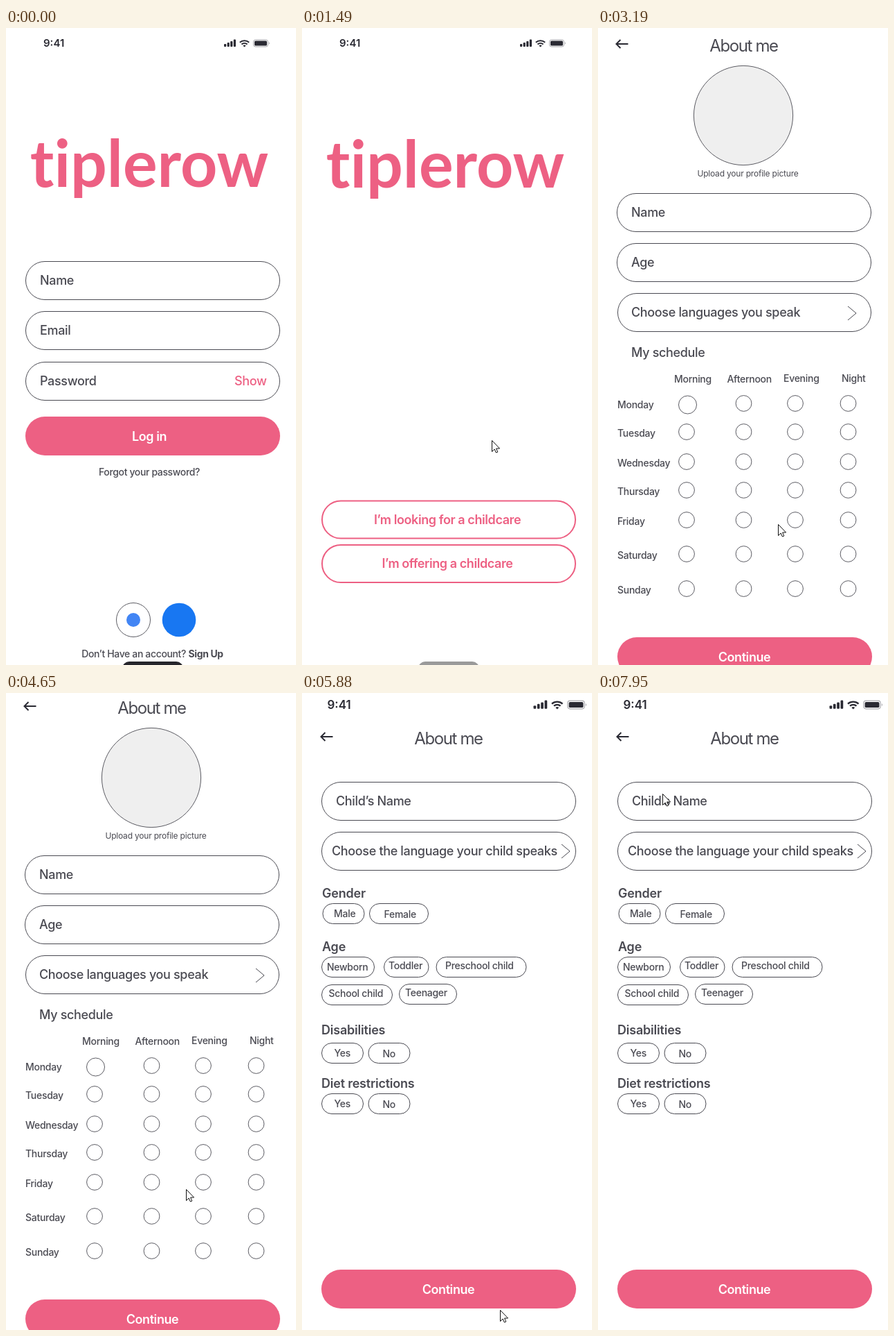
These frames come from a looping animation (419x918 px, 8 s). An HTML page:

```html
<!DOCTYPE html>
<html lang="en">
<head>
<meta charset="utf-8">
<title>Childcare sign-up</title>
<style>
  html, body { margin: 0; width: 100%; height: 100%; overflow: hidden; background: #fff; }
  svg { display: block; width: 100vw; height: 100vh; }
  text { font-family: Inter, sans-serif; fill: #4a4a52; white-space: pre; }
  .field { font-size: 18px; font-weight: 500; letter-spacing: -.35px; }
  .strong { font-size: 18px; font-weight: 600; letter-spacing: -.42px; }
  .heading { font-size: 18px; font-weight: 600; letter-spacing: -.22px; }
  .small { font-size: 14px; font-weight: 500; letter-spacing: -.28px; }
  .note { font-size: 14px; font-weight: 500; letter-spacing: -.36px; }
  .caption { font-size: 12px; letter-spacing: -.2px; }
  .title { font-size: 24px; letter-spacing: -1.4px; }
  .brand { font: 700 93px Lato, sans-serif; font-variant-ligatures: none; }
  .clock { font-weight: 600; fill: #2a2a33; }
  .pink { fill: #ed6083; }
  .white { fill: #fff; }
  .mid { text-anchor: middle; }
  .line { fill: none; stroke: #4a4a52; }
</style>
</head>
<body>
<svg viewBox="0 0 419 918" preserveAspectRatio="none">
  <g id="screens"></g>
  <circle id="tap" r="12" fill="#000" opacity=".15"/>
  <g id="cursor" fill="#fff" stroke="#111" stroke-linejoin="round">
    <path id="arrow" d="M.5 .5V16.5L4.2 13L6.4 18L8.8 17L6.6 12H11.6Z"/>
    <path id="hand" d="M0 15V2a1.7 1.7 0 0 1 3.4 0V9c0-1.6 3-1.6 3 .4c0-1.4 2.8-1.2 2.8 .6c0-1.3 2.6-1 2.6 .8V16c0 3-1.6 4-1.8 6.5H2C1.5 20-2 17.5-4 14.5C-5.3 12.3-2.5 11-1 13ZM3.4 9v4M6.4 10v3M9.2 10.6v2.4"/>
  </g>
</svg>
<script>
const LOOP = 8000;
const $ = id => document.getElementById(id);

const text = (x, y, style, content) => `<text x="${x}" y="${y}" class="${style}">${content}</text>`;
const pill = (x, y, w, h, attrs = 'class="line"') =>
  `<rect x="${x}" y="${y}" width="${w}" height="${h}" rx="${h / 2}" ${attrs}/>`;
const ring = (x, y, r, fill = 'none') =>
  `<circle cx="${x}" cy="${y}" r="${r}" fill="${fill}" stroke="#4a4a52" stroke-width=".9"/>`;
const field = (x, y, label, textX = x + 20.5, w = 367) =>
  pill(x, y, w, 55) + text(textX, y + 33.5, 'field', label);
const button = (y, label, x = 211.5) =>
  pill(28, y, 368, 56, 'class="pink"') + text(x, y + 34.5, 'strong white mid', label);
const outlineButton = (y, label) =>
  pill(29, y, 366, 54, 'fill="none" stroke="#ed6083" stroke-width="2"') +
  text(210, y + 33, 'strong pink mid', label);
const chip = (x, y, w, textX, textY, label) =>
  pill(x + .5, y + .5, w, 29) + text(textX, textY, 'small', label);
const chevron = (x, y) => `<path d="M${x} ${y - 10}l12 10l-12 10" class="line"/>`;
const backArrow = (x, y) =>
  `<path d="M${x + 18} ${y}H${x + 1}m6-6l-6 6l6 6" fill="none" stroke="#2a2a33" stroke-width="2"/>`;
const brand = y => text(207, y, 'brand pink mid', 'tiplerow');
const homeBar = color => `<rect x="168" y="913" width="88" height="20" rx="10" fill="${color}"/>`;

function statusBar(clockX, clockSize, x, y, scale) {
  const bars = [4, 6, 8, 10.5].map((h, i) =>
    `<rect x="${i * 4.6}" y="${5 - h}" width="3.2" height="${h}" rx="1"/>`).join('');
  return `<text x="${clockX}" y="${y + clockSize * .36}" class="clock" font-size="${clockSize}">9:41</text>
    <g transform="translate(${x} ${y}) scale(${scale})" fill="#2a2a33">${bars}
      <path d="M22.8 -1.2a10 10 0 0 1 13.4 0M25.4 1.5a6.2 6.2 0 0 1 8.2 0" fill="none" stroke="#2a2a33" stroke-width="2"/>
      <path d="M27.4 3.4a3.2 3.2 0 0 1 4.2 0l-2.1 2.2z"/>
      <rect x="42.5" y="-5" width="21" height="10" rx="3" fill="none" stroke="#a9a9ae"/>
      <rect x="44" y="-3.5" width="18" height="7" rx="1.6"/>
      <path d="M65 -1.7q2 1.7 0 3.4z" fill="#a9a9ae"/></g>`;
}

function login() {
  return statusBar(54, 15, 315, 22, 1) + brand(229) +
    field(28.5, 336.5, 'Name') + field(28.5, 408.5, 'Email') + field(28.5, 481.5, 'Password') +
    text(330, 515, 'field pink', 'Show') + button(560, 'Log in', 207) +
    text(207, 645, 'note mid', 'Forgot your password?') +
    ring(184, 853, 24.5) + '<circle cx="184" cy="853" r="10" fill="#4285f4"/>' +
    '<circle cx="250" cy="853" r="24.3" fill="#1877f2"/>' +
    text(211.5, 907, 'note mid', 'Don’t Have an account? <tspan font-weight="700">Sign Up</tspan>') +
    homeBar('#26262c');
}

function choice() {
  return statusBar(54, 15, 315, 22, 1) + brand(230) +
    outlineButton(681.5, 'I’m looking for a childcare') +
    outlineButton(745, 'I’m offering a childcare') + homeBar('#9a9a9a');
}

function profile() {
  const days = { Monday: 541, Tuesday: 582, Wednesday: 625, Thursday: 666, Friday: 709, Saturday: 758, Sunday: 808 };
  const columns = [128, 210.5, 285, 361.5];
  const rows = Object.entries(days).map(([day, y]) =>
    text(28, y + 6.5, 'small', day) + columns.map((x, i) =>
      day === 'Monday' && !i ? ring(129.5, 543, 13) : ring(x, y, 11.4)).join('')).join('');
  return backArrow(25.5, 23) + text(210.5, 34, 'title mid', 'About me') +
    ring(210, 126, 71.6, '#efefef') + text(216.5, 214, 'caption mid', 'Upload your profile picture') +
    field(27.5, 238.5, 'Name') + field(27.5, 310.5, 'Age') +
    field(28.5, 382.5, 'Choose languages you speak', 48, 366) + chevron(361, 411) +
    text(48, 474, 'field', 'My schedule') +
    text(110, 511, 'small', 'Morning') + text(186.5, 511, 'small', 'Afternoon') +
    text(268, 510, 'small', 'Evening') + text(352, 510, 'small', 'Night') +
    rows + button(878, 'Continue');
}

function child() {
  return statusBar(36.5, 17, 334.5, 17, 1.16) + backArrow(26.5, 63) +
    text(211.5, 74, 'title mid', 'About me') +
    field(28.5, 128.5, 'Child’s Name') +
    field(28.5, 200.5, 'Choose the language your child speaks', 43) + chevron(375, 228) +
    text(29, 295, 'heading', 'Gender') +
    chip(29.5, 303, 60, 46, 323, 'Male') + chip(97, 303, 85, 118.5, 324, 'Female') +
    text(29, 372, 'heading', 'Age') +
    chip(28, 380, 76, 36, 400, 'Newborn') + chip(118, 380, 64.5, 125, 398, 'Toddler') +
    chip(193.5, 380, 130, 207, 398, 'Preschool child') +
    chip(28, 420, 102, 38.5, 438, 'School child') + chip(140, 419, 83, 149, 437, 'Teenager') +
    text(28, 492, 'heading', 'Disabilities') +
    chip(28, 504, 60, 46.5, 524, 'Yes') + chip(95.5, 504, 60, 116.5, 525, 'No') +
    text(28, 569, 'heading', 'Diet restrictions') +
    chip(28, 577, 60, 46.5, 597, 'Yes') + chip(95.5, 577, 60, 116.5, 598, 'No') +
    button(831, 'Continue');
}

// hot: vertical range in which the pointer becomes a hand
const screens = [
  { draw: login, start: 0, hot: [560, 616] },
  { draw: choice, start: 1360, fade: 130, hot: [681, 737] },
  { draw: profile, start: 3120, hot: [874, 918] },
  { draw: child, start: 5880, hot: [128, 184] }
];
$('screens').innerHTML = screens.map(s =>
  `<g><rect width="419" height="918" fill="#fff"/>${s.draw()}</g>`).join('');
screens.forEach((s, i) => s.node = $('screens').children[i]);

// Pointer stops: [time, x, y]
const stops = [
  [0, 382, 922], [90, 382, 922], [890, 274, 594],
  [1790, 274, 594], [2260, 260, 715],
  [5000, 260, 715], [5820, 286, 889],
  [6480, 286, 889], [6950, 2, 290], [7290, 91, 152], [7360, 93, 145],
  [LOOP, 93, 145]
];
const taps = [[1290, 1490], [2920, 3120], [7820, 7950]];

function pointerAt(t) {
  const i = stops.findIndex(s => s[0] > t);
  const [t0, x0, y0] = stops[i - 1], [t1, x1, y1] = stops[i];
  const p = (t - t0) / (t1 - t0), e = p * p * (3 - 2 * p);
  return [x0 + (x1 - x0) * e, y0 + (y1 - y0) * e];
}

const show = (node, on) => node.setAttribute('visibility', on ? 'visible' : 'hidden');

function render() {
  const t = performance.now() % LOOP;
  const current = screens.findLastIndex(s => t >= s.start);
  const { start, fade, hot, node } = screens[current];
  const opacity = fade ? Math.min(1, (t - start) / fade) : 1;
  screens.forEach((s, i) => show(s.node, i === current || (i === current - 1 && opacity < 1)));
  node.setAttribute('opacity', opacity);
  screens[2].node.setAttribute('transform', `translate(0 ${t < 4650 ? 0 : -4})`);

  const [x, y] = pointerAt(t);
  const isHand = y >= hot[0] && y <= hot[1] && t < 7950;
  const place = `translate(${Math.round(x)} ${Math.round(y)})`;
  $('cursor').setAttribute('transform', place);
  $('tap').setAttribute('transform', place);
  show($('hand'), isHand);
  show($('arrow'), !isHand);
  show($('tap'), taps.some(([from, to]) => t >= from && t < to));
  requestAnimationFrame(render);
}
render();
</script>
</body>
</html>
```
